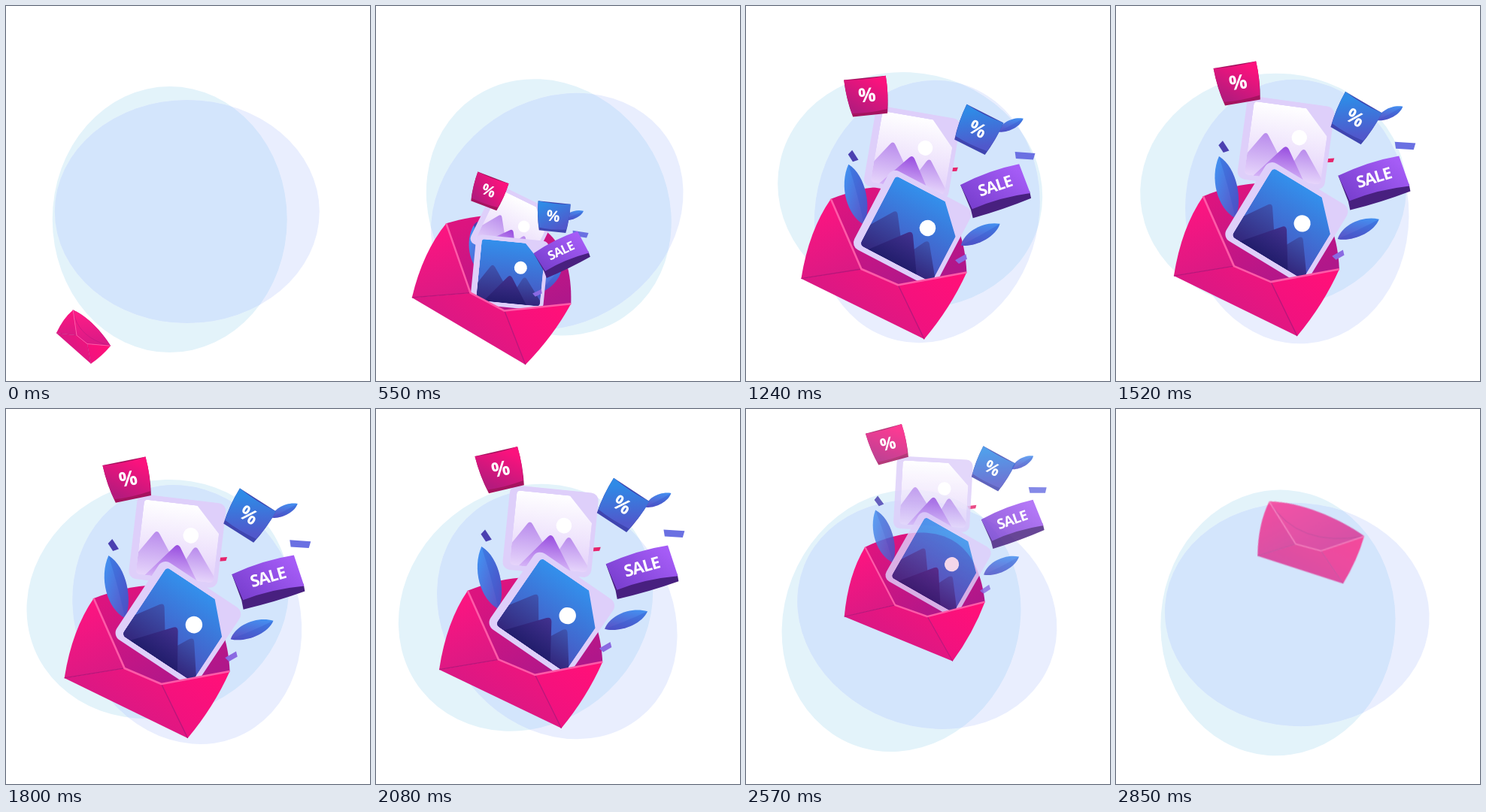
An HTML page that plays this animation: 484x499 px, repeating every 2920 ms.

```html
<!DOCTYPE html>
<html lang="en">
<head>
<meta charset="utf-8">
<title>Sale envelope</title>
<style>
  html, body { margin: 0; width: 100%; height: 100%; overflow: hidden; background: #fff; }
  svg { display: block; width: 100%; height: 100%; }
  text { font: 700 27px "Open Sans", "Noto Sans", sans-serif; font-stretch: extra-condensed; fill: #fff; text-anchor: middle; }
  .sale { font-size: 22px; letter-spacing: -1px; }
</style>
</head>
<body>
<svg viewBox="0 0 484 499">
  <defs id="defs">
    <clipPath id="overlap"><ellipse class="cyan" rx="156" ry="177"/></clipPath>
    <clipPath id="picture"><path d="M-47 -53H22L57 -17V46Q57 53 50 53H-46Q-53 53 -53 46V-47Q-53 -53 -47 -53Z"/></clipPath>
  </defs>
  <ellipse class="cyan" rx="156" ry="177" fill="#e3f3fa"/>
  <ellipse class="lilac" rx="176" ry="148.5" fill="#e9eefe"/>
  <g clip-path="url(#overlap)"><ellipse class="lilac" rx="176" ry="148.5" fill="#d3e5fc"/></g>
  <g id="envelope">
    <path class="flap" fill="url(#inside)"/>
    <path class="flap lid" fill="url(#cover)"/>
    <path class="lid" d="M117 248Q162 350 298 345" fill="none" stroke="#b9187f" stroke-width="1.5"/>
    <g id="behind"></g>
    <path d="M117 248L158 341L78 354Q88 290 117 248Z" fill="url(#left)"/>
    <path d="M158 341L207 362L242 434L78 354Z" fill="url(#front)"/>
    <path d="M207 362L298 345Q277 392 242 434Z" fill="url(#right)"/>
    <path d="M78 354L158 341M207 362L242 434" fill="none" stroke="#b8157a" stroke-width="1.3"/>
    <path d="M117 248L158 341L207 362L298 345" fill="none" stroke="#ff5aa8" stroke-width="2.6" stroke-linejoin="round"/>
    <g id="ahead"></g>
  </g>
</svg>
<script>
const LOOP = 2920, STEPS = 42;
const HOME = { x: 183.75, y: 345.25 };
const $ = id => document.getElementById(id);
const setAll = (selector, name, value) =>
  document.querySelectorAll(selector).forEach(node => node.setAttribute(name, value));

const gradient = (id, angle, from, to) => $('defs').innerHTML +=
  `<linearGradient id="${id}" gradientTransform="rotate(${angle} .5 .5)">
   <stop stop-color="${from}"/><stop offset="1" stop-color="${to}"/></linearGradient>`;
gradient('inside', 60, '#dc147f', '#b0178a');
gradient('cover', 60, '#fa1c86', '#d81a86');
gradient('left', 75, '#ff1480', '#d91a84');
gradient('front', 140, '#f0147d', '#cf1a88');
gradient('right', 125, '#ff1079', '#ee1280');
gradient('red', -50, '#b51a7d', '#fb127d');
gradient('blue', 50, '#2f8ae6', '#5058cb');
gradient('violet', -20, '#7a40d0', '#a55cf6');
gradient('leaf', 60, '#4292f2', '#5a4fc4');
gradient('dusk', 90, '#3390ec', '#4a50bd');
gradient('duskFar', 90, '#3e55b0', '#33267c');
gradient('duskNear', 90, '#42328f', '#221d6c');
gradient('dawn', 90, '#ffffff', '#e3d0fa');
gradient('dawnFar', 90, '#b98bec', '#e6d5fb');
gradient('dawnNear', 90, '#984ddf', '#d5b4f7');

const photo = sky => `
  <rect x="-63" y="-60" width="126" height="120" rx="11" fill="#decffa"/>
  <g clip-path="url(#picture)">
    <rect x="-53" y="-53" width="111" height="106" fill="url(#${sky})"/>
    <path d="M-53 22L-34 -7Q-30 -13 -26 -7L16 53H-53Z" fill="url(#${sky}Far)"/>
    <path d="M0 53L23 9Q27 3 31 9L58 45V53Z" fill="url(#${sky}Far)"/>
    <path d="M-40 53L-3 8Q1 3 5 8L34 53Z" fill="url(#${sky}Near)"/>
  </g>
  <circle cx="18" cy="-10" r="11" fill="#fff"/>`;
const tag = (face, side) => `
  <path d="M-30 -24L28 -25Q30 2 26 27L-22 28Q-29 4 -30 -24Z" fill="${side}"/>
  <path d="M-30 -24Q-2 -21 28 -25Q30 -2 26 21Q0 25 -23 23Q-29 0 -30 -24Z" fill="url(#${face})"/>
  <text y="9">%</text>`;
const sale = `
  <path d="M-45 -18L-42 19L-43 31Q0 33 42 30L43 20Z" fill="#48207f"/>
  <path d="M-45 -18Q0 -25 41 -20L43 23Q0 15 -40 19Z" fill="url(#violet)"/>
  <text class="sale" y="6">SALE</text>`;
const leaf = `
  <path d="M0 -41C20 -22 18 22 4 41C-16 24 -18 -16 0 -41Z" fill="url(#leaf)"/>
  <path d="M0 -41C20 -22 18 22 4 41C4 15 3 -10 0 -41Z" fill="#2f50c8" opacity=".3"/>`;
const chip = (color, w, h) =>
  `<path d="M${-w / 2} ${-h / 2}H${w / 2}L${w / 2 - 2} ${h / 2}H${2 - w / 2}Z" fill="${color}"/>`;

// Each item has its hovering pose, and a spin it loses on the way out
const items = [];
function add(layer, art, x, y, turn, size = 1, spin = 0) {
  const node = document.createElementNS('http://www.w3.org/2000/svg', 'g');
  node.innerHTML = art;
  $(layer).append(node);
  items.push({ node, x, y, turn, size, spin });
}
add('behind', leaf, 146, 234, -12, 1.05);
add('behind', leaf, 326, 289, 69, .75, -73);
add('behind', chip('#4b40b0', 16, 8), 143, 179, 57);
add('behind', chip('#e6246c', 14, 5), 287, 197, -4);
add('behind', photo('dawn'), 228, 173, 7, .94, 34);
add('behind', photo('dusk'), 229, 282, 33, 1.02, -76);
add('ahead', chip('#8a6ae2', 17, 7), 300, 326, -30);
add('ahead', chip('#6a70e2', 28, 9), 390, 177, 4);
add('ahead', leaf, 369, 132, 65, .48);
add('ahead', tag('red', '#a5135f'), 163, 91, -10, 1, 65);
add('ahead', tag('blue', '#3f45b0'), 322, 139, 33, .98, -72);
add('ahead', sale, 348, 222, -16, 1, -33);

const mix = (a, b, u) => a + (b - a) * u;
const ramp = (k, from, to) => Math.min(1, Math.max(0, (k - from) / (to - from)));
const pose = (x, y, turn, size) => `translate(${x} ${y}) rotate(${turn}) scale(${size})`;

// The envelope slows into a hover, then speeds away
function flight(k) {
  const before = 1 - ramp(k, 0, 24), after = ramp(k, 24, 41);
  const drift = before ** 2.2, leave = after ** 2.5;
  return pose(
    183 - 81 * drift + 73 * leave,
    350 + 92 * drift - 170 * leave,
    15.6 * before ** 3 - 8.1 * after ** 3,
    1 - .663 * before ** 7 - .345 * after ** 3.2
  );
}

function drawBlobs(k) {
  const spin = -180 * k / STEPS;
  const orbit = (78 + 2 * spin) * Math.PI / 180;
  const x = 214.5 + 15.5 * Math.cos(orbit), y = 264.5 + 20 * Math.sin(orbit);
  setAll('.cyan', 'transform', pose(x, y, spin, 1));
  setAll('.lilac', 'transform', pose(240.8, 273.5, spin, 1));
}

function drawEnvelope(k) {
  const open = ramp(k, 1, 4) * (1 - ramp(k, 37, 40.5));
  const flap = `M117 248C${mix(180, 200, open)} ${mix(258, 215, open)} ` +
    `${mix(250, 292, open)} ${mix(300, 220, open)} 298 345L207 362L158 341Z`;
  setAll('.flap', 'd', flap);
  setAll('.lid', 'opacity', 1 - open);
  $('envelope').setAttribute('transform', flight(k) + ` translate(${-HOME.x} ${-HOME.y})`);
  $('envelope').setAttribute('opacity', 1 - .27 * ramp(k, 37, 41));
}

// Items burst from the middle of the envelope and settle exponentially
function drawItems(k) {
  const fade = ramp(k, 2, 4) * (1 - ramp(k, 35, 41) ** 1.6);
  const spread = 1.05 * (1 - Math.exp(-Math.max(0, k - 2) / 7.5)) * mix(.8, 1, fade);
  for (const { node, x, y, turn, size, spin } of items) {
    node.setAttribute('transform', pose(
      mix(HOME.x, x, spread), mix(HOME.y, y, spread),
      turn + spin * (1 - spread), size * mix(.5, 1, spread)
    ));
    node.setAttribute('opacity', fade);
  }
}

// The picture holds in steps of about 70 ms
function tick() {
  const t = performance.now() % LOOP;
  const k = Math.min(STEPS - 1, Math.floor((t + Math.min(20, t / 40)) / 70));
  drawBlobs(k);
  drawEnvelope(k);
  drawItems(k);
  requestAnimationFrame(tick);
}
tick();
</script>
</body>
</html>
```
